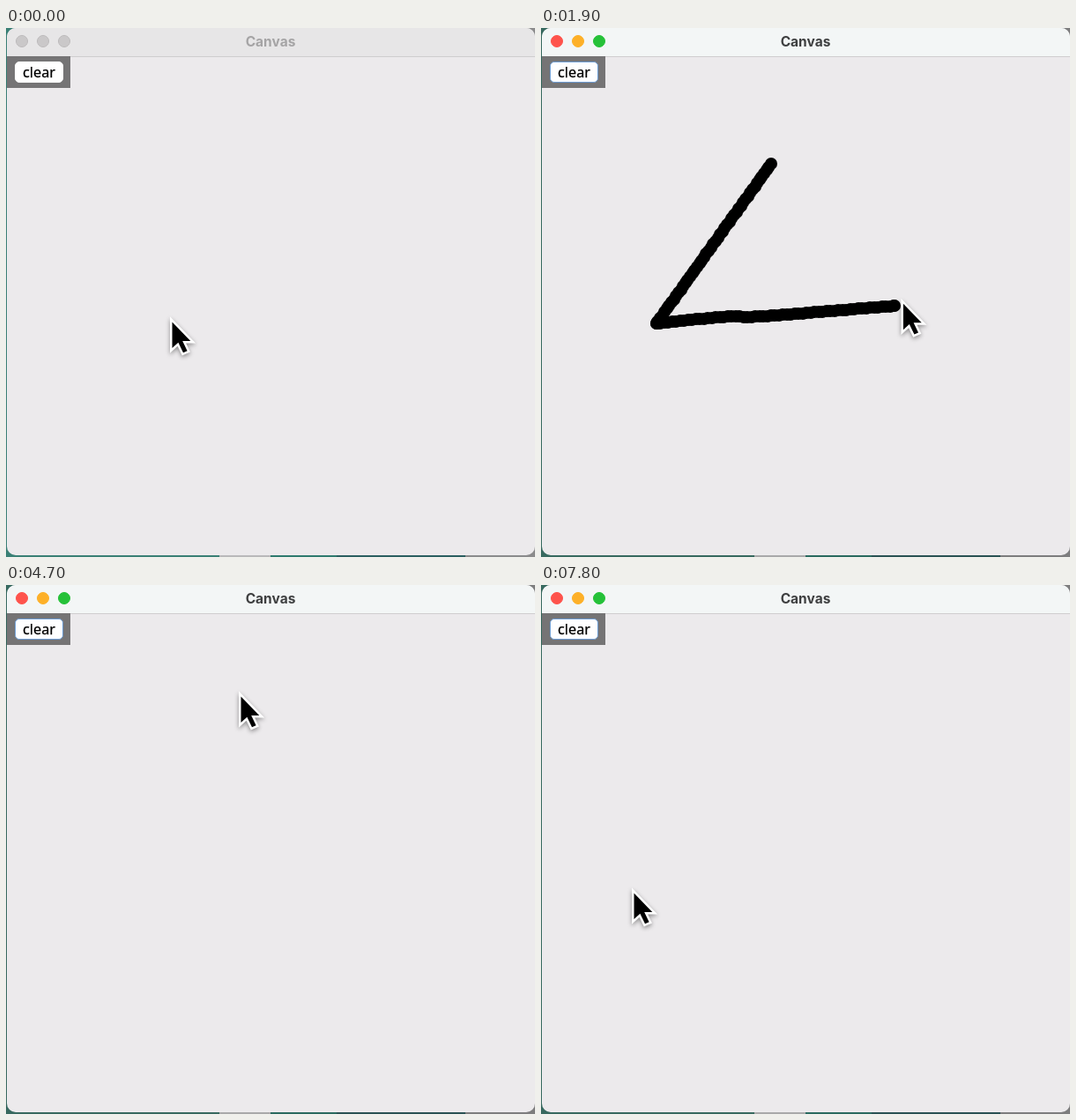
Recreate the animation shown at these times as an HTML page with a canvas. Size 600 by 600 pixels, loop 8 s.

```html
<!DOCTYPE html>
<html lang="en">
<head>
<meta charset="utf-8">
<title>Canvas</title>
<style>
  html, body { margin: 0; width: 100%; height: 100%; overflow: hidden; }
  #stage {
    position: absolute; left: 0; top: 0; width: 600px; height: 600px; overflow: hidden;
    background: linear-gradient(90deg, #3a8075 242px, #b9b9ba 242px 300px, #2f7a6e 300px 375px,
      #2b5f60 375px 521px, #8b8b8c 521px);
  }
  #stage.active {
    background: linear-gradient(90deg, #37695f 242px, #a9a9aa 242px 300px, #2a6a5f 300px 375px,
      #2a5254 375px 521px, #7d7d7e 521px);
  }
  #win {
    position: absolute; left: 1px; top: 0; width: 599px; height: 598px;
    border-radius: 10px; overflow: hidden; background: #eceaec;
  }
  #bar {
    position: absolute; left: 0; top: 0; width: 599px; height: 32px;
    background: #e7e6e7; border-bottom: 1px solid #cfcdcf;
  }
  .active #bar { background: #f3f6f6; }
  #title {
    position: absolute; left: 0; width: 598px; top: 0; text-align: center;
    font: 700 15.5px/31px Inter, "Open Sans", sans-serif; color: #a5a4a5;
  }
  .active #title { color: #3e3f40; }
  .light {
    position: absolute; top: 8px; width: 14px; height: 14px; box-sizing: border-box;
    border-radius: 50%; background: #cac8c9; border: 1px solid #bcbabb;
  }
  .active .light { background: var(--c); border-color: var(--c); }
  #panel { position: absolute; left: 0; top: 32px; width: 72px; height: 36px; background: #757475; }
  #clear {
    position: absolute; left: 9px; top: 6px; width: 55px; height: 24px; box-sizing: border-box;
    border-radius: 5px; background: #fff; border: 1px solid #fff; text-align: center;
    font: 500 16.2px/22px "Noto Sans", "Open Sans", sans-serif; color: #000;
    -webkit-text-stroke: 0.25px #000;
  }
  .active #clear { border-color: #6c9bd2; }
  canvas { position: absolute; left: 0; top: 0; }
</style>
</head>
<body>
<div id="stage">
  <div id="win">
    <div id="bar">
      <span class="light" style="left:10px;--c:#fe534c"></span>
      <span class="light" style="left:34px;--c:#fdb028"></span>
      <span class="light" style="left:58px;--c:#25c138"></span>
      <div id="title">Canvas</div>
    </div>
    <div id="panel"><div id="clear">clear</div></div>
  </div>
  <canvas id="view" width="600" height="600"></canvas>
</div>
<script>
const LOOP = 8000, STEP = 100, ACTIVE_AT = 700;
const RADIUS = 7, SPACING = 4.5;
const stage = document.getElementById('stage');
const ctx = document.getElementById('view').getContext('2d');

const smooth = k => k * k * (3 - 2 * k);
const easeOut = k => Math.sin(k * Math.PI / 2);
const mix = (a, b, k) => a + (b - a) * k;
const clamp = k => Math.min(1, Math.max(0, k));

// Pen lines; the ink trails the pointer by `lag` ms
const apex = [261, 154], left = [131, 335], right = [415, 314];
const side = (start, end, ...points) => ({ points, start, end, clearAt: 3600, lag: 40, ease: smooth });
const lines = [
  side(800, 1250, apex, left),
  side(1250, 1953, left, [214, 327], [250, 327], right),
  side(1953, 3000, right, [385, 294], [308, 217], apex),
  {
    points: [[279,127],[248,127],[205,153],[170,200],[161,249],[185,305],[250,338],
      [312,342],[358,317],[386,262],[384,215],[352,161],[279,127]],
    start: 4850, end: 6365, clearAt: 7400, lag: 100, ease: easeOut
  }
];

// Pointer rests between lines: [time, x, y]
const rests = [
  [0,187,329], [600,260,148], [3000,260,148], [3600,36,50], [3700,36,50], [4500,263,122],
  [4700,265,122], [4850,278,121], [6600,278,121], [7300,36,50], [7400,36,50], [7800,104,345]
];

const arrow = [[1.5,4.5],[1.5,34],[8.4,27.7],[14,39.2],[18.6,37.2],[13.2,26],[22.3,26]];

// Value in rows whose first column rises
function lookup(rows, v, ease = k => k) {
  const i = Math.max(1, rows.findIndex(r => r[0] >= v));
  const a = rows[i - 1], b = rows[i];
  const k = ease(clamp((v - a[0]) / (b[0] - a[0])));
  return [mix(a[1], b[1], k), mix(a[2], b[2], k)];
}

function spline(a, b, c, d, k) {
  return b + k / 2 * (c - a + k * (2 * a - 5 * b + 4 * c - d + k * (3 * (b - c) + d - a)));
}

// Smooth curve through the points as rows of [distance, x, y]
function trace(points) {
  const at = i => points[Math.min(points.length - 1, Math.max(0, i))];
  const rows = [[0, ...points[0]]];
  for (let i = 0; i < points.length - 1; i++) {
    for (let k = 1; k <= 12; k++) {
      const [x, y] = [0, 1].map(j =>
        spline(at(i - 1)[j], at(i)[j], at(i + 1)[j], at(i + 2)[j], k / 12));
      const [d, px, py] = rows[rows.length - 1];
      rows.push([d + Math.hypot(x - px, y - py), x, y]);
    }
  }
  return rows;
}

for (const line of lines) {
  line.path = trace(line.points);
  line.length = line.path[line.path.length - 1][0];
}

const reached = (line, t) =>
  line.length * line.ease(clamp((t - line.start) / (line.end - line.start)));

function pointer(t) {
  const line = lines.find(l => t >= l.start && t <= l.end);
  if (!line) return lookup(rests, t, smooth);
  const [x, y] = lookup(line.path, reached(line, t));
  return [x - 1, y - 6];
}

function dot([x, y]) {
  ctx.beginPath();
  ctx.arc(Math.round(x), Math.round(y), RADIUS, 0, Math.PI * 2);
  ctx.fill();
}

function drawLine(line, t) {
  if (t < line.start || t >= line.clearAt) return;
  const reach = reached(line, t - line.lag);
  ctx.fillStyle = '#000';
  for (let d = 0; d < reach; d += SPACING) dot(lookup(line.path, d));
  dot(lookup(line.path, reach));
}

function drawPointer([x, y]) {
  ctx.save();
  ctx.translate(x, y);
  ctx.beginPath();
  arrow.forEach(p => ctx.lineTo(...p));
  ctx.closePath();
  ctx.lineWidth = 5;
  ctx.miterLimit = 3;
  ctx.strokeStyle = '#fff';
  ctx.shadowColor = 'rgba(0,0,0,0.4)';
  ctx.shadowBlur = 5;
  ctx.shadowOffsetY = 2;
  ctx.stroke();
  ctx.shadowColor = 'transparent';
  ctx.fillStyle = '#000';
  ctx.fill();
  ctx.restore();
}

function draw(t) {
  stage.classList.toggle('active', t >= ACTIVE_AT);
  ctx.clearRect(0, 0, 600, 600);
  lines.forEach(line => drawLine(line, t));
  drawPointer(pointer(t));
}

const origin = performance.now();
function tick() {
  const t = (performance.now() - origin) % LOOP;
  draw(Math.floor(t / STEP) * STEP);
  requestAnimationFrame(tick);
}
tick();
</script>
</body>
</html>
```
